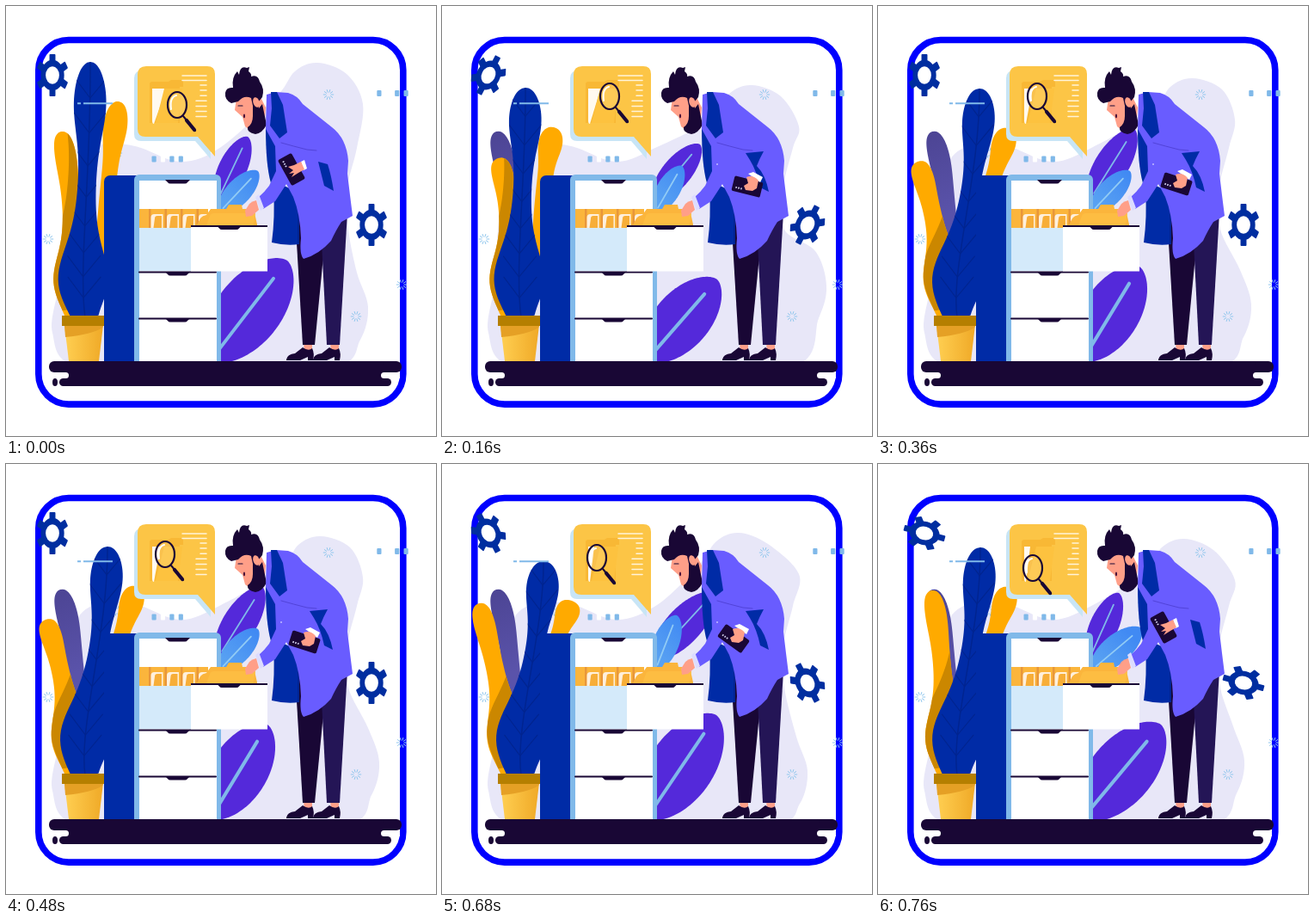
Recreate the animation shown at these times as an HTML page with a canvas. Size 500 by 500 pixels, loop 0.8 s.

```html
<!DOCTYPE html>
<html lang="en">
<head>
<meta charset="utf-8">
<title>Searching the files</title>
<style>
html, body { margin: 0; width: 100%; height: 100%; overflow: hidden; background: #fff; }
canvas { display: block; width: 500px; height: 500px; }
</style>
</head>
<body>
<canvas id="stage" width="500" height="500"></canvas>
<script>
const ctx = document.getElementById('stage').getContext('2d');
const LOOP = 800, FIRST_CUT = 160, STEP = 200;
const NAVY = '#002ba6', DARK = '#190735', COAT = '#695cff', SKIN = '#ff9f88';
const ORANGE = '#ffaa00', BROWN = '#cb8700', PURPLE = '#5429da', SKY = '#80b9e9', PALE = '#e8e7f8';

const points = text => text.split(' ').map(p => p.split(',').map(Number));

// Key point of each moving part, one per held pose.
const blueTips = points('98,65 97,95 118,96 118,113 119,97');
const orangeTips = points('64,146 65,177 46,181 43,162 62,147');
const bigTips = points('327,296 320,318 304,303 319,292 329,303');
const topTips = points('281,152 300,161 298,143 316,150 280,150');
const lightTips = points('293,192 279,186 293,192 273,176 306,191');
const crowns = points('362,66 360,92 366,84 345,80 356,87');
const hips = points('421,350 447,325 434,347 425,357 426,345');
const lenses = points('199,115 195,105 185,105 180,109 180,121');
const phones = points('332,190 355,210 347,207 339,203 332,190');
const phoneTurns = [61, 14, 18, 36, 61];
const gearTurns = [0, 27, 0, -27, 105];

// Closed Catmull-Rom curve.
function smooth(p) {
  const path = new Path2D(), n = p.length, at = i => p[(i + n) % n];
  path.moveTo(...p[0]);
  for (let i = 0; i < n; i++) {
    const [a, b, c, d] = [at(i - 1), at(i), at(i + 1), at(i + 2)];
    path.bezierCurveTo(b[0] + (c[0] - a[0]) / 6, b[1] + (c[1] - a[1]) / 6,
      c[0] - (d[0] - b[0]) / 6, c[1] - (d[1] - b[1]) / 6, c[0], c[1]);
  }
  return path;
}

function onSpine([a, b, c, d], t) {
  const u = 1 - t;
  return [0, 1].map(k => u * u * u * a[k] + 3 * u * u * t * b[k] + 3 * u * t * t * c[k] + t * t * t * d[k]);
}

// Outline around a cubic spine; width(t) is half the breadth from root to tip.
function leaf(spine, width, steps = 60) {
  const left = [], right = [];
  for (let i = 0; i <= steps; i++) {
    const t = 1 - (1 - i / steps) ** 1.5;
    const [x, y] = onSpine(spine, t);
    const [ax, ay] = onSpine(spine, t - 0.01), [bx, by] = onSpine(spine, t + 0.01);
    const k = width(t) / Math.hypot(bx - ax, by - ay);
    left.push([x + (by - ay) * k, y - (bx - ax) * k]);
    right.unshift([x - (by - ay) * k, y + (bx - ax) * k]);
  }
  return new Path2D('M' + [...left, ...right].join('L') + 'Z');
}

const bump = (t, mid, spread) => Math.exp(-(((t - mid) / spread) ** 2));
const plumeWidth = (neck, head, belly) => t =>
  (neck + head * bump(t, 0.88, 0.14) + belly * bump(t, 0.22, 0.2)) * Math.sqrt(1 - t ** 30);

function fill(shape, color) {
  ctx.fillStyle = color;
  ctx.fill(typeof shape === 'string' ? new Path2D(shape) : shape);
}
function stroke(d, color, width, cap = 'round') {
  ctx.strokeStyle = color;
  ctx.lineWidth = width;
  ctx.lineCap = cap;
  ctx.stroke(new Path2D(d));
}
function box(x, y, w, h, color, r = 0) {
  ctx.beginPath();
  ctx.roundRect(x, y, w, h, r);
  ctx.fillStyle = color;
  ctx.fill();
}
function oval(x, y, rx, ry, color, turn = 0) {
  ctx.beginPath();
  ctx.ellipse(x, y, rx, ry, turn, 0, 7);
  ctx.fillStyle = color;
  ctx.fill();
}
function fade(x0, y0, x1, y1, from, to) {
  const g = ctx.createLinearGradient(x0, y0, x1, y1);
  g.addColorStop(0, from);
  g.addColorStop(1, to);
  return g;
}
function within(shape, paint) {
  ctx.save();
  ctx.clip(shape);
  paint();
  ctx.restore();
}

function backdrop(i) {
  const [cx, cy] = crowns[i], [hx, hy] = hips[i];
  fill(smooth([
    [cx, cy], [cx + 34, cy + 13], [415, cy + 48], [408, 165], [396, 215], [398, 260],
    [hx - 13, hy - 40], [hx, hy], [hx - 9, hy + 38], [hx - 40, 420],
    ...points('230,424 85,420 54,380 62,320 66,250 80,185 108,162 150,163 203,181 250,164'),
    [cx - 48, cy + 40], [cx - 26, cy + 10]
  ]), PALE);
  ctx.beginPath();
  ctx.roundRect(37.8, 39.5, 424, 423.6, 35);
  ctx.strokeStyle = '#0000ff';
  ctx.lineWidth = 7.6;
  ctx.stroke();
}

function gear(x, y, degrees) {
  ctx.save();
  ctx.translate(x, y);
  ctx.rotate(degrees * Math.PI / 180);
  ctx.scale(0.77, 1);
  ctx.strokeStyle = '#002ea0';
  ctx.lineWidth = 7.5;
  ctx.beginPath();
  ctx.arc(0, 0, 14, 0, 7);
  ctx.stroke();
  for (let i = 0; i < 6; i++) {
    box(-4.5, -24.5, 9, 10, '#002ea0', 1);
    ctx.rotate(Math.PI / 3);
  }
  ctx.restore();
}

function sparkle(x, y) {
  for (let i = 0; i < 10; i++) {
    const c = Math.cos(i * Math.PI / 5), s = Math.sin(i * Math.PI / 5);
    stroke(`M${x + 3 * c} ${y + 3 * s}L${x + 5.8 * c} ${y + 5.8 * s}`, '#91c7ed', 1);
  }
}

function dots(x, y) {
  [SKY, '#fff', SKY, SKY].forEach((c, i) => box(x + i * 10.4, y, 5.2, 7, c, 1));
}

function plants(i) {
  const [bx, by] = blueTips[i], [ox, oy] = orangeTips[i];
  const spine = [[92, 362], [84, 305], [bx + 1, 195], [bx, by]];
  const blue = leaf(spine, plumeWidth(10, 9, 19));
  const orange = leaf([[84, 362], [76, 300], [ox + 17, 225], [ox, oy]], plumeWidth(10, 2.5, 15));
  const rear = leaf([[112, 300], [115, 240], [bx + 22, 190], [bx + 33, by + 46]], plumeWidth(9, 5, 0));
  if (i) {
    fill(leaf([[86, 362], [80, 300], [88, 225], [63, 146]], plumeWidth(10, 2.5, 10)),
      fade(60, 150, 90, 240, '#4d4595', '#5a53aa'));
  }
  fill(rear, ORANGE);
  fill(orange, ORANGE);
  within(orange, () => {
    ctx.translate(-11, -10);
    fill(blue, BROWN);
  });
  fill(blue, NAVY);
  within(blue, () => {
    stroke('M' + spine[0] + 'C' + spine.slice(1).join(' '), '#002490', 1.5);
    for (let t = 0.12; t < 0.95; t += 0.11) {
      const [x, y] = onSpine(spine, t);
      stroke(`M${x - 18} ${y - 24}L${x} ${y}L${x + 20} ${y - 24}`, '#002490', 1.2);
    }
  });
  fill('M68 371H113L108 413H73Z', fade(68, 0, 112, 0, '#ffcf52', '#f0aa28'));
  fill('M68 372H113L112 374Q100 382 69 385Z', '#e5a025');
  box(65, 360, 50, 12, '#b57f00');
}

function blade(root, tip, breadth, color, vein, veinWidth) {
  const at = t => root.map((v, k) => v + (tip[k] - v) * t);
  const half = breadth * Math.hypot(tip[0] - root[0], tip[1] - root[1]);
  fill(leaf([0, 1 / 3, 2 / 3, 1].map(at), t => half * Math.max(0, 4 * t * (1 - t)) ** 0.6), color);
  stroke(`M${at(0.1)}L${at(0.82)}`, vein, veinWidth);
}

function handle(x, y) {
  fill(`M${x} ${y}h29l-3 3q-1 1.5 -3 1.5h-17q-2 0 -3 -1.5z`, DARK);
}

function cabinet() {
  box(114, 197, 45, 216, NAVY, [7, 0, 0, 0]);
  box(149, 196, 101, 217, SKY, [6, 6, 0, 0]);
  box(155, 203, 90, 210, '#fff');
  stroke('M155 309.5H244M155 363.5H244', DARK, 2);
  for (const y of [202, 309, 363]) handle(185, y);
  box(155, 236, 80, 23, '#fbb53c');
  for (let x = 155; x < 230; x += 18.5) {
    box(x + 11, 236, 2.5, 22, '#e8963a');
    fill(`M${x + 13.5} 258V246q0 -4 4 -4h10v16Z`, '#fff0dc');
    fill(`M${x + 16.5} 258l1.5 -11q0 -3 3 -3h5v14Z`, '#f7ae38');
  }
  fill('M220 258L226 247Q228 244 233 243L238 236H256L259 231H274L275 236H288L292 254V258Z', '#fbb53c');
  fill('M232 258L237 244Q238 241 242 241H290L287 258Z', '#fdbd42');
  box(155, 258, 60, 50, '#d4eafa');
  box(215, 256, 89, 52.5, '#fff');
  box(215, 255, 89, 2, DARK);
  handle(245, 255.5);
}

function bubble(i) {
  const [x, y] = lenses[i];
  fill('M159 75H238V178L220 157H157Q149 157 149 149V84Q149 75 159 75Z', '#c8e5f6');
  fill('M163 70H234Q243 70 243 79V175L223 152H162Q153 152 153 143V80Q153 70 163 70Z', '#fcc546');
  fill('M167 91Q167 88 170 88H189L192 86H206V94H202V136H167Z', '#f8b835');
  fill(`M170 96H${170 + (x - 170) / 2 + 2}L172 137Q170 137 170 133Z`, '#fffaf0');
  fill('M184 96H205L200 136H174Z', '#fdc23f');
  stroke('M205 81H233M205 86.5H233', '#fff4d9', 1.5);
  for (let n = 0; n < 7; n++) {
    const start = n < 3 ? 226 : 221;
    stroke(`M${start} ${92 + n * 6.1}H233`, '#fff4d9', 1.5);
  }
  stroke(`M${x + 7} ${y + 13}L${x + 21} ${y + 30}`, DARK, 2);
  stroke(`M${x + 11} ${y + 18}L${x + 20} ${y + 29}`, DARK, 4.2);
  oval(x, y, 11, 15, 'rgba(255,245,220,.15)');
  ctx.strokeStyle = DARK;
  ctx.lineWidth = 2.2;
  ctx.stroke();
  stroke(`M${x - 7} ${y + 5}Q${x - 9} ${y - 9} ${x - 1} ${y - 11}`, '#fff', 2);
}

function head() {
  fill('M268 107L293 100L302 118L300 143L288 148L278 140L275 129L266 121Z', SKIN);
  fill('M287 108Q293 112 294 119L298 114L303 138Q298 148 290 149Q280 147 281 141Q287 137 287 128Z', DARK);
  fill('M262 113Q254 109 255 101Q256 94 264 95Q262 83 269 76L271 80Q272 69 280 72L283 71L282 76Q286 79 285 82Q293 79 295 88Q301 96 298 106L293 112L287 116L285 107Q277 103 270 111Z', DARK);
  oval(291, 112, 3.6, 6, SKIN, -0.3);
  stroke('M270 116L275 116', DARK, 1.2);
  oval(277, 128, 1.1, 2.4, '#4a1238');
}

function shoe(x) {
  fill(`M${x + 20} 392h10v8l-9 1z`, SKIN);
  fill(`M${x} 411Q${x + 1} 405 ${x + 10} 404L${x + 19} 397Q${x + 26} 402 ${x + 30} 398Q${x + 33} 404 ${x + 31} 412H${x + 25}V408L${x + 16} 412H${x}Z`, DARK);
}

function man(i) {
  const near = i % 4 === 0;
  shoe(326);
  shoe(357);
  fill('M335 225L372 260L359 394H345Z', DARK);
  fill('M397 240L367 275L373 394H388Z', '#241556');
  fill('M315 205L336 215L341 240V277Q325 279 309 275Q313 245 311 215Z', NAVY);
  stroke('M340 238V276', '#001f80', 1);
  fill('M302 142L315 160L318 200L308 206Q302 185 302 142Z', NAVY);
  head();
  fill('M303 103L314 100L328 101Q339 104 345 114L379 141Q396 154 398 180L397 195L400 220L403 244L390 251Q384 260 378 273Q364 289 346 294Q341 289 343 270Q342 242 334 222L326 207L313 227L299 236L293 223Q301 216 306 209L314 192L313 163L302 143Z', COAT);
  fill('M308 100H315L322 115L327 147L318 154L307 139L309 119Z', NAVY);
  stroke('M320 159Q334 163 350 167L361 168', '#5143d8', 1);
  oval(320, 184, 0.8, 0.8, '#fff');
  fill('M290 222L294 219L300 235L296 238Z', '#dcdcff');
  fill('M291 226Q286 227 283 230L278 238L279 245L286 244L294 237Z', SKIN);
  fill(near
    ? 'M363 181L374 184Q378 196 381 215L370 209Z'
    : 'M353 171L374 169Q369 178 366 186Q376 196 380 216L370 211Q366 192 358 179Z', NAVY);

  const [x, y] = phones[i], hx = x + 6, hy = y - 4;
  ctx.save();
  ctx.translate(x, y);
  ctx.rotate(phoneTurns[i] * Math.PI / 180);
  box(-17, -9, 34, 18, DARK, 2);
  for (let dx = -13; dx < -6; dx += 3) box(dx, 3, 1.5, 2, '#d8d8f4');
  ctx.restore();
  if (near) {
    fill(`M${hx + 5} ${hy - 5}l4 -2l3 10l-4 2z`, '#fff');
    fill(`M${hx - 10} ${hy + 1}l7 -2l8 -4l4 9l-7 4l-8 5l3 -5l-6 1l5 -4z`, SKIN);
  } else {
    fill(`M${hx - 5} ${hy - 11}l6 -2l11 6l-3 6z`, '#fff');
    fill(`M${hx - 7} ${hy - 7}q8 -3 14 4l-2 9l-5 3l-8 -1l-2 -5l5 -3z`, SKIN);
  }
}

function ground() {
  box(50, 413, 410, 13, DARK, 6);
  box(70, 413, 370, 29, DARK, 4);
  box(62, 433, 386, 9, DARK, 4.5);
  oval(57, 437.5, 3, 4.5, DARK);
  box(56, 426, 17, 7, '#fff', [0, 3.5, 3.5, 0]);
  box(436, 426, 22, 7, '#fff', [3.5, 0, 0, 3.5]);
}

function draw(i) {
  ctx.fillStyle = '#fff';
  ctx.fillRect(0, 0, 500, 500);
  backdrop(i);
  for (const [x, y] of points('375,103 129,171 49,271 460,324 407,361')) sparkle(x, y);
  plants(i);
  stroke('M83 113.3H87M90 113.3H124', SKY, 2, 'butt');
  gear(54, 80.5, gearTurns[i]);
  gear(425, 254.5, gearTurns[i]);
  blade([238, 412], bigTips[i], 0.26, PURPLE, SKY, 4);
  blade([246, 226], topTips[i], 0.2, PURPLE, SKY, 1.8);
  blade([248, 240], lightTips[i], 0.22, fade(255, 230, 290, 195, '#58a1f2', '#418af3'), '#91cbf5', 1.8);
  bubble(i);
  dots(169.5, 174.5);
  dots(431.3, 98);
  cabinet();
  man(i);
  ground();
}

function tick() {
  const time = performance.now() % LOOP;
  draw(Math.floor((time - FIRST_CUT) / STEP) + 1);
  requestAnimationFrame(tick);
}
tick();
</script>
</body>
</html>
```
